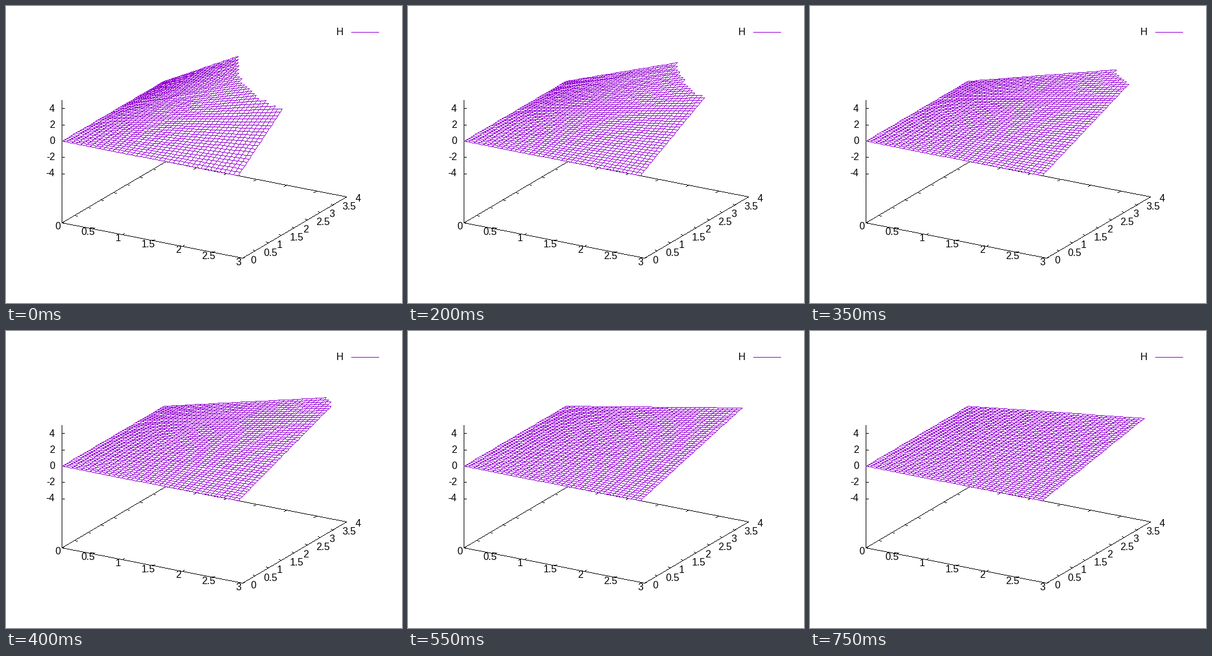
These frames come from a looping animation (640x480 px, 0.8 s). A matplotlib script:

```python
import numpy as np
import matplotlib.pyplot as plt
from matplotlib.animation import FuncAnimation

W, H, DPI = 640, 480, 100
FRAMES, INTERVAL = 16, 50
BLACK, PURPLE = (0, 0, 0), (148, 0, 211)
FONT_PX = 16

# Oblique projection: base corner, axis vectors and height per unit, in pixels
ORIGIN = np.array([90, 350])
X_UNIT = np.array([291.6, 57.2]) / 3
Y_UNIT = np.array([168.4, -99.0]) / 4
Z_UNIT = 13.2
Z_BASE, Z_MAX = -10, 5

fig = plt.figure(figsize=(W / DPI, H / DPI), dpi=DPI, facecolor="white")
ax = fig.add_axes([0, 0, 1, 1])
ax.axis("off")


def project(x, y, z=Z_BASE):
    x, y, z = (np.asarray(v, float)[..., None] for v in (x, y, z))
    lift = Z_UNIT * (z - Z_BASE) * np.array([0, 1])
    return ORIGIN + X_UNIT * x + Y_UNIT * y - lift


def nearest(v):
    return np.floor(v + 0.5).astype(int)


def draw_lines(canvas, start, end, color):
    """Draw hard one-pixel segments between arrays of points."""
    start = nearest(np.reshape(start, (-1, 2)))
    delta = nearest(np.reshape(end, (-1, 2))) - start
    steps = np.maximum(abs(delta).max(axis=1), 1)[:, None]
    k = np.minimum(np.arange(steps.max() + 1), steps)
    points = start[:, None] + delta[:, None] * (k / steps)[..., None]
    cols, rows = np.moveaxis(nearest(points), -1, 0)
    canvas[rows, cols] = color


def draw_tick(canvas, point, dx, dy):
    draw_lines(canvas, point, point + np.array([dx, dy]), BLACK)


def draw_axes(canvas):
    corners = project([0, 3, 3, 0], [0, 0, 4, 4])
    draw_lines(canvas, corners, np.roll(corners, -1, axis=0), BLACK)
    draw_lines(canvas, project(0, 0), project(0, 0, Z_MAX), BLACK)
    for x in np.arange(0, 3.1, 0.5):
        draw_tick(canvas, project(x, 0), 4, -2)
        draw_tick(canvas, project(x, 4), -4, 2)
    for y in np.arange(0, 4.1, 0.5):
        draw_tick(canvas, project(3, y), -4, -1)
        draw_tick(canvas, project(0, y), 4, 1)
    for z in range(-4, 5, 2):
        draw_tick(canvas, project(0, 0, z), 4, 0)
    draw_lines(canvas, (558, 42), (602, 42), PURPLE)


def label(x, y, text, ha):
    ax.text(x, nearest(y + 5.2), text, family="Liberation Sans",
            size=FONT_PX * 72 / DPI, ha=ha, va="baseline", color="black")


def add_labels():
    for k in range(7):
        label(83.7 + 48.65 * k, 355.6 + 9.65 * k, f"{k / 2:g}", "center")
    for k in range(9):
        label(395.8 + 21.05 * k, 410.8 - 12.45 * k, f"{k / 2:g}", "left")
    for z in range(-4, 5, 2):
        label(79, 218 - 13 * z, f"{z}", "right")
    label(545.5, 42, "H", "right")


def draw_mesh(canvas, height):
    gx, gy = np.meshgrid(np.linspace(0, 2.93, 39), np.linspace(0, 3.915, 47))
    z = height * gx * gy
    points = project(gx, gy, z)
    shown = z <= Z_MAX
    # a segment needs both of its ends inside the z range
    across = shown[:, :-1] & shown[:, 1:]
    along = shown[:-1] & shown[1:]
    draw_lines(canvas, points[:, :-1][across], points[:, 1:][across], PURPLE)
    draw_lines(canvas, points[:-1][along], points[1:][along], PURPLE)


backdrop = np.full((H, W, 3), 255, np.uint8)
draw_axes(backdrop)
image = ax.imshow(backdrop, extent=(0, W, H, 0), aspect="auto",
                  interpolation="nearest")
add_labels()


def update(n):
    canvas = backdrop.copy()
    draw_mesh(canvas, 1.1 ** -n)
    image.set_data(canvas)
    return [image]


anim = FuncAnimation(fig, update, frames=FRAMES, interval=INTERVAL,
                     repeat=True, repeat_delay=0, blit=False)
plt.show()
```
